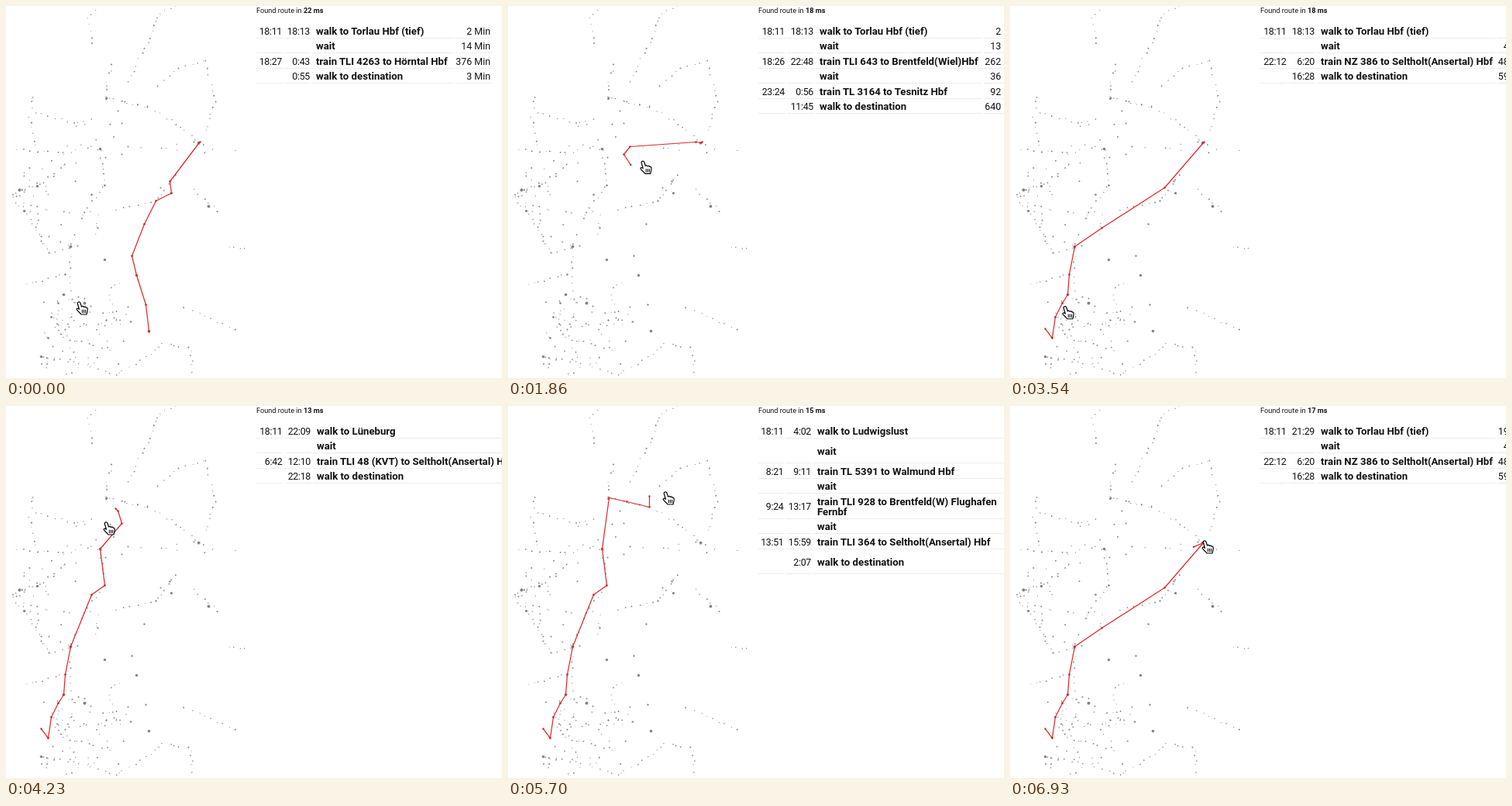
Animation, 640 px wide and 480 px high, one loop 7230 ms. Source, as an HTML page:

```html
<!DOCTYPE html>
<html lang="en">
<head>
<meta charset="utf-8">
<title>Train route finder</title>
<style>
  html, body { margin: 0; width: 100%; height: 100%; overflow: hidden; background: #fff; }
  svg { display: block; width: 640px; height: 480px; }
  text { font-family: Roboto, "Open Sans", sans-serif; font-size: 12.4px; fill: #111; white-space: pre; }
  .title { font-size: 9.2px; }
  .leg { font-size: 13.2px; }
  .leg, .title tspan { font-weight: 700; }
  .time { letter-spacing: -.3px; }
  .end { text-anchor: end; }
  .rule { stroke: #ececec; fill: none; }
  #stations { fill: #858585; }
  #route { fill: none; stroke: #dc2a2e; stroke-width: 1.25; stroke-linejoin: round; marker: url(#stop); }
  #hand { fill: #fff; stroke: #000; stroke-width: 1.2; stroke-linejoin: round; stroke-linecap: round; }
</style>
</head>
<body>
<svg viewBox="0 0 640 480">
  <defs>
    <marker id="stop" markerUnits="userSpaceOnUse" viewBox="-2 -2 4 4" markerWidth="4" markerHeight="4">
      <circle r="1.2" fill="#dc2a2e"/>
    </marker>
  </defs>
  <g id="stations"></g>
  <polyline id="route" transform="translate(.5 .5)"/>
  <g id="panel"></g>
  <g id="hand">
    <path d="M-1.8 1.5C-1.7 -.6 1.4 -.8 2 1.2L3.5 6C4.4 5 6 5.4 6.3 6.5C7.5 5.6 8.8 6.2 9 7.2C10.4 6.8 11.2 7.8 11.2 9C11.4 12 10.5 13 10 16H3C2 14 -1 12.5 -2.5 10C-3.5 8.2 -1.5 7.4 .5 9.3Z"/>
    <path d="M4.4 10.2v3.6M6.5 10.2v3.6M8.6 10.2v3.6" stroke-width="1"/>
  </g>
</svg>
<script>
const LOOP = 7230, STEP = 30, REST = 6930, MIN_PER_PX = 38, LAG = 120, DROP = 3330, PICK = 3750;
const $ = id => document.getElementById(id);
const parse = s => s.trim().split(/\s+/).map(p => p.split(',').map(Number));

// Itineraries: rows are "departure|arrival|text|minutes|tall"; "~" breaks a line
const south = '248,177 211,226 213,241 193,251 178,281 162,322 168,347 180,385 184,419';
const middle = '121,184 127,231 110,243';
const rhine = '83,310 76,346 74,372 67,383 58,401 54,428';
const trips = [
  { at: 0, ms: 22, x: 400, right: 625, line: south, rows: [
    '18:11|18:13|walk to Torlau Hbf (tief)|2', '||wait|14',
    '18:27|0:43|train TLI 4263 to Hörntal Hbf|376', '|0:55|walk to destination|3'] },
  { at: 1260, ms: 18, x: 402, right: 660,
    line: `249,176 242,175 157,181 149,191 128,195 127,231 110,243 118,286 92,309 82,311
      55,318 45,303 45,297 38,285 24,264 17,236`, rows: [
    '18:11|18:13|walk to Torlau Hbf (tief)|2', '||wait|13',
    '18:26|22:48|train TLI 643 to Brentfeld(Wiel)Hbf|262', '||wait|36',
    '23:24|0:56|train TL 3164 to Tesnitz Hbf|92', '|3:48|walk to destination|163'] },
  { at: 2430, ms: 16, x: 400, right: 625, line: south + ' 160,407 129,405', rows: [
    '18:11|18:13|walk to Torlau Hbf (tief)|2', '||wait|14',
    '18:27|0:43|train TLI 4263 to Hörntal Hbf|376', '||wait|161',
    '3:24|4:38|train TLI 294 to Oxe Hbf|74', '|8:38|walk to destination|231'] },
  { at: 4230, ms: 13, x: 401, right: 720, line: `144,135 149,151 ${middle} ${rhine}`, rows: [
    '18:11|22:09|walk to Lüneburg|238', '||wait|513',
    '6:42|12:10|train TLI 48 (KVT) to Seltholt(Ansertal) Hbf|328', '|22:18|walk to destination|597'] },
  { at: 5010, ms: 14, x: 402, right: 674.5,
    line: '157,388 161,407 139,402 129,405 109,387 101,383 101,377 93,375 85,378 74,372 67,383 58,401 54,428', rows: [
    '18:11|21:27|walk to Donauwörth|196', '||wait|42',
    '22:09|22:28|train TLI 852 to Eschrode Hbf|19', '||wait|124',
    '0:32|3:35|train TLI 4739 to Dorsfelde Hbf|183', '||wait|28',
    '4:03|5:29|train TL 835 to Seltholt(Ansertal) Hbf|86', '|15:37|walk to destination|597'] },
  { at: 5700, ms: 15, x: 399, right: 720, line: `182,130 153,123 130,118 ${middle} ${rhine}`, rows: [
    '18:11|4:02|walk to Ludwigslust|591', '||wait|259|tall',
    '8:21|9:11|train TL 5391 to Walmund Hbf|50', '||wait|13',
    '9:24|13:17|train TLI 928 to Brentfeld(W) Flughafen~Fernbf|233|tall', '||wait|34',
    '13:51|15:59|train TLI 364 to Seltholt(Ansertal) Hbf|128', '|2:07|walk to destination|597|tall'] },
  { at: REST, ms: 17, x: 401, right: 674.5, line: `249,176 199,234 118,286 ${rhine}`, rows: [
    '18:11|21:29|walk to Torlau Hbf (tief)|198', '||wait|43',
    '22:12|6:20|train NZ 386 to Seltholt(Ansertal) Hbf|488', '|16:28|walk to destination|597'] }
];
for (const trip of trips) {
  trip.nodes = parse(trip.line);
  trip.rows = trip.rows.map(r => r.split('|'));
}

// Station map: larger hubs, trip stops, small stations strewn along tracks and in dense regions
const hubs = parse('129,119 121,184 248,176 23,264 17,237 40,232 83,310 74,372 184,419 127,327 168,347 101,383 213,241 45,452 261,258');
const tracks = [
  '119,4 105,13 111,55', '137,73 128,100 129,118', '220,0 194,10 187,38 154,103',
  '256,70 219,82 193,105', '256,70 270,122 255,165', '129,118 182,130 218,150 248,176',
  '33,113 33,136 85,150 114,145', '12,185 80,190 94,180 121,184', '29,140 38,186',
  '5,248 17,236 40,233 80,198', '17,236 24,264 55,318 83,310', '121,184 127,231 97,270',
  '141,262 193,251 223,211', '240,235 277,268', '118,268 114,300', '83,310 82,372',
  '22,360 76,346', '45,452 100,462 140,476 178,455 200,435 238,440 240,476',
  '60,400 72,427 137,443', '135,380 133,364 150,355', '229,388 301,420', '285,310 312,314'
].map(parse);
const regions = [[100, 425, 55, 50, 70], [30, 240, 28, 32, 18], [70, 285, 40, 25, 16], [90, 210, 50, 60, 14], [230, 180, 70, 12, 10]];

let seed = 11;
const rnd = () => (seed = seed * 16807 % 2147483647) / 2147483647;
const small = () => .5 + rnd() * .55;
const dot = (x, y, r) => `<circle cx="${x.toFixed(1)}" cy="${y.toFixed(1)}" r="${r.toFixed(2)}"/>`;

function stationMap() {
  let out = hubs.map(([x, y]) => dot(x + .5, y + .5, 1.5 + rnd() * .7)).join('');
  for (const [x, y] of trips.flatMap(trip => trip.nodes)) out += dot(x + .5, y + .5, 1);
  for (const track of tracks) {
    for (let i = 1; i < track.length; i++) {
      const [ax, ay] = track[i - 1], [bx, by] = track[i];
      const n = Math.ceil(Math.hypot(bx - ax, by - ay) / 9);
      for (let k = 0; k < n; k++) {
        const u = (k + rnd() * .6) / n;
        out += dot(ax + (bx - ax) * u + rnd() * 3 - 1, ay + (by - ay) * u + rnd() * 3 - 1, small());
      }
    }
  }
  for (const [x, y, w, h, count] of regions) {
    for (let k = 0; k < count; k++) out += dot(x + (rnd() * 2 - 1) * w, y + (rnd() * 2 - 1) * h, small());
  }
  return out;
}
$('stations').innerHTML = stationMap();

// The hand's drag path: time,x,y
const keys = parse(`-120,184,420 0,94,382 600,40,445 930,8,370 1140,47,294 1260,52,255 1900,175,200
  2310,131,411 2430,107,416 2850,50,445 3330,45,416 3480,45,416 3750,250,175 4110,141,132 4230,129,150
  4600,165,395 4890,152,388 5010,136,336 5320,125,150 5580,182,116 5700,203,111 6000,240,95
  6400,140,230 6930,251,174`);

// Monotone cubic interpolation: smooth, without overshoot
function path(t) {
  const last = keys.length - 1;
  if (t >= keys[last][0]) return keys[last].slice(1);
  const i = keys.findIndex(k => k[0] > t) - 1;
  const h = keys[i + 1][0] - keys[i][0], u = (t - keys[i][0]) / h;
  return [1, 2].map(c => {
    const slope = j => (keys[j + 1][c] - keys[j][c]) / (keys[j + 1][0] - keys[j][0]);
    const tangent = j => {
      if (j === 0 || j === last) return 0;
      const a = slope(j - 1), b = slope(j);
      return a * b <= 0 ? 0 : 2 * a * b / (a + b);
    };
    const p = keys[i][c], q = keys[i + 1][c], ease = u * u * (3 - 2 * u);
    return p + (q - p) * ease + h * u * (1 - u) * (tangent(i) * (1 - u) - tangent(i + 1) * u);
  });
}

const dist = (a, b) => Math.hypot(a[0] - b[0], a[1] - b[1]);
const nearest = (nodes, p) => nodes.reduce((best, n, i) => dist(n, p) < dist(nodes[best], p) ? i : best, 0);

// First the goal is dragged, then the start; both trail behind the hand
function findRoute(trip, t) {
  const start = path(Math.max(t - LAG, PICK)), goal = path(Math.min(t - LAG, DROP));
  const { nodes } = trip, i = nearest(nodes, start), j = Math.max(i, nearest(nodes, goal));
  const walks = [dist(start, nodes[i]), dist(goal, nodes[j])];
  return { trip, walks, effort: walks[0] + walks[1], points: [start, ...nodes.slice(i, j + 1), goal] };
}
const bestRoute = t => trips.map(trip => findRoute(trip, t)).reduce((a, b) => b.effort < a.effort ? b : a);
for (const trip of trips) trip.walks = findRoute(trip, trip.at).walks;

function addMinutes(clock, n) {
  const [h, m] = clock.split(':').map(Number), total = (h * 60 + m + n + 14400) % 1440;
  return Math.floor(total / 60) + ':' + String(total % 60).padStart(2, '0');
}
function stretchWalk(row, px) {
  const minutes = Math.max(2, +row[3] + Math.round(px * MIN_PER_PX));
  return [row[0], addMinutes(row[1], minutes - row[3]), row[2], minutes, row[4]];
}
const label = (x, y, cls, s) => s === '' ? '' : `<text x="${x}" y="${y}" class="${cls}">${s}</text>`;

function panel({ trip, walks }, t) {
  const rows = trip.rows.slice(), end = rows.length - 1;
  rows[0] = stretchWalk(rows[0], walks[0] - trip.walks[0]);
  rows[end] = stretchWalk(rows[end], walks[1] - trip.walks[1]);

  const ms = trip.ms + Math.round(3 * Math.abs(Math.sin((t - trip.at) / 97)));
  const { x, right } = trip, c1 = 356 + (x - 400) / 2, c2 = x - 8;
  let out = `<text x="323" y="9" class="title">Found route in <tspan>${ms} ms</tspan></text>`;
  let top = 22.5, rules = '';
  for (const [from, to, text, minutes, tall] of rows) {
    const height = tall ? 32.5 : 19.5, base = top + height / 2 + 4.7;
    const lines = text.split('~');
    out += label(c1, base, 'time end', from) + label(c2, base, 'time end', to);
    lines.forEach((s, k) => out += label(x, base + (k - (lines.length - 1) / 2) * 13, 'leg', s));
    out += label(right, base, 'end', minutes + ' Min');
    top += height;
    const y = Math.floor(top) - .5;
    rules += `M323 ${y}H${c1 + 1}M${c1 + 3} ${y}H${c2 + 1}M${c2 + 3} ${y}H${right - 48}M${right - 46} ${y}H${right + 2}`;
  }
  return `<path class="rule" d="${rules}"/>` + out;
}

let shown = -1;
function draw(t) {
  if (t === shown) return;
  shown = t;
  const route = bestRoute(t);
  $('route').setAttribute('points', route.points.map(p => p.map(v => v.toFixed(1))).join(' '));
  $('panel').innerHTML = panel(route, t);
  $('hand').setAttribute('transform', `translate(${path(t)})`);
}

const origin = performance.now();
function frame() {
  const t = (performance.now() - origin) % LOOP;
  draw(Math.min(REST, Math.floor(t / STEP) * STEP));
  requestAnimationFrame(frame);
}
frame();
</script>
</body>
</html>
```
